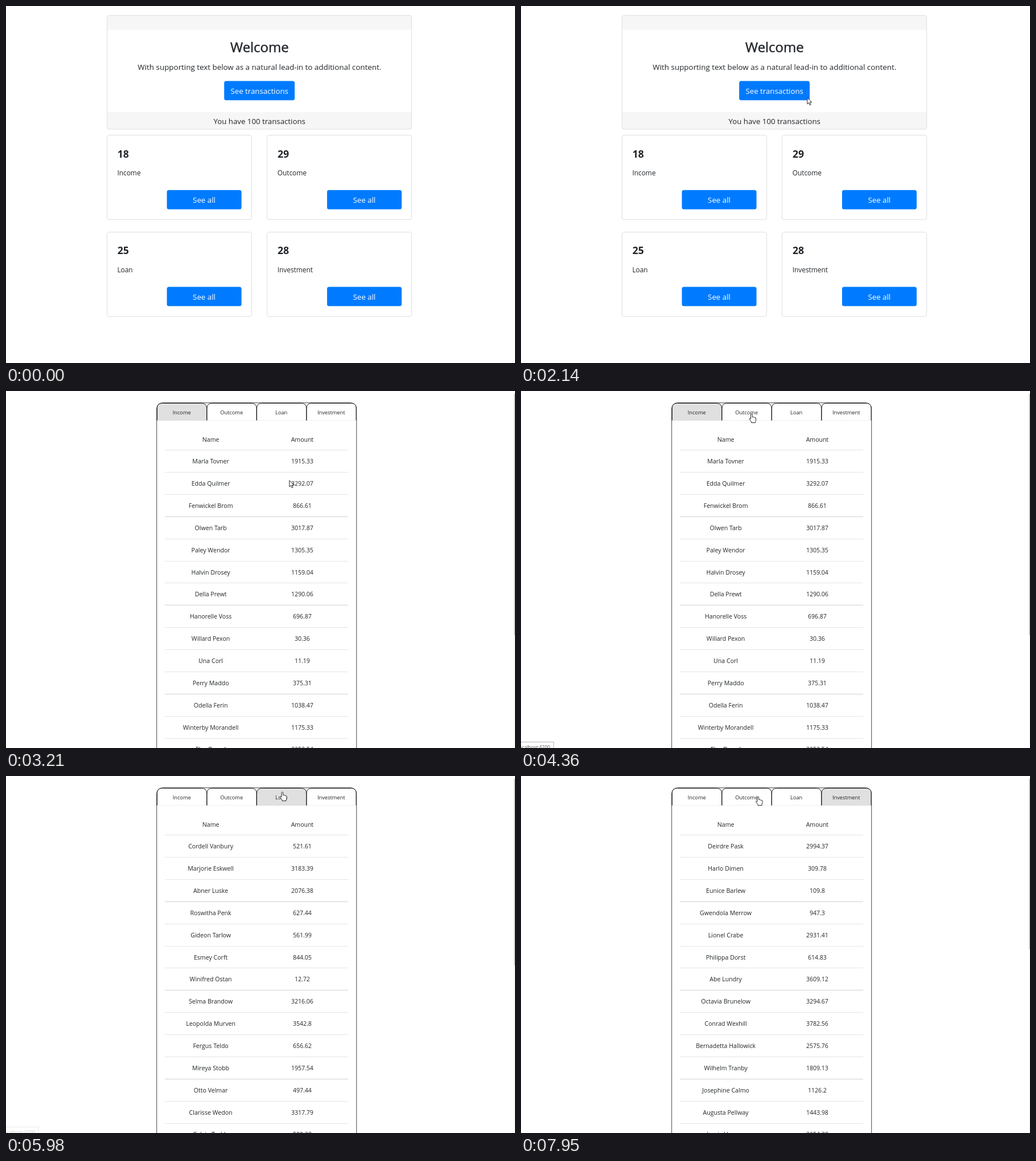
An HTML page that plays this animation: 894 by 626 pixels, repeating every 8 s.

```html
<!DOCTYPE html>
<html lang="en">
<head>
<meta charset="utf-8">
<title>Transactions</title>
<style>
  html, body { margin: 0; width: 100%; height: 100%; overflow: hidden; background: #fff; }
  svg { display: block; width: 894px; height: 626px; }
  text { font-family: "Open Sans", "Noto Sans", sans-serif; fill: #212529; }
  .mid { text-anchor: middle; }
  .title { stroke: #212529; stroke-width: .45; }
  .btn { fill: #007bff; }
  .light { fill: #fff; }
  .card { fill: none; stroke: #dfdfdf; }
  .edge { fill: none; stroke: #222; }
</style>
</head>
<body>
<svg id="stage" viewBox="0 0 894 626"></svg>
<script>
const LOOP = 8000;
const tabs = ["Income", "Outcome", "Loan", "Investment"];
const counts = [18, 29, 25, 28];
const thumbEnds = [428, 295, 332, 304];
const clicks = [2740, 4700, 5790, 6930];   // when each table opens
const tables = [
  `Marla Tovner 1915.33,Edda Quilmer 3292.07,Fenwickel Brom 866.61,Olwen Tarb 3017.87,
   Paley Wendor 1305.35,Halvin Drosey 1159.04,Della Prewt 1290.06,Hanorelle Voss 696.87,
   Willard Pexon 30.36,Una Corl 11.19,Perry Maddo 375.31,Odella Ferin 1038.47,
   Winterby Morandell 1175.33,Elsa Drood 2252.54`,
  `Hester Colvo 637.46,Wendell Marsk 130.79,Tove Haldon 2954.88,Corin Vade 719.06,
   Petra Windell 3467.11,Bartholme Quennor 2787.56,Lorelle Gantby 1679.23,Sibyl Tranec 3795.72,
   Quentin Albro 1174.04,Theobald Cressy 64.52,Rosanne Holderbyn 1457.18,Orville Tamsk 640.7,
   Ned Falderwin 2048.49,Hollie Wend 2464.34`,
  `Cordell Vanbury 521.61,Marjorie Eskwell 3183.39,Abner Luske 2076.38,Roswitha Penk 627.44,
   Gideon Tarlow 561.99,Esmey Corft 844.05,Winifred Ostan 12.72,Selma Brandow 3216.06,
   Leopolda Murven 3542.8,Fergus Teldo 656.62,Mireya Stobb 1957.54,Otto Velmar 497.44,
   Clarisse Wedon 3317.79,Colvin Turkle 508.23`,
  `Deirdre Pask 2994.37,Harlo Dimen 309.78,Eunice Barlew 109.8,Gwendola Merrow 947.3,
   Lionel Crabe 2931.41,Philippa Dorst 614.83,Abe Lundry 3609.12,Octavia Brunelow 3294.67,
   Conrad Wexhill 3782.56,Bernadetta Hallowick 2575.76,Wilhelm Tranby 1809.13,Josephine Calmo 1126.2,
   Augusta Pellway 1443.98,Lewis Hanner 2654.33`
].map(s => s.split(",").map(r => r.trim().match(/(.+) (\S+)/).slice(1)));

// Pointer path: time, x, y
const path = [
  [330, 866, 626], [1100, 760, 297], [1370, 706, 243], [1930, 521, 169], [2330, 486, 153],
  [3100, 486, 153], [3410, 518, 163], [3690, 518, 163], [4360, 405, 40], [4720, 405, 40],
  [5370, 490, 40], [5510, 485.5, 36], [5590, 485.5, 36], [5650, 485.5, 28], [6140, 485.5, 28],
  [6870, 567.5, 36], [7350, 567.5, 36], [7610, 458.5, 33], [7830, 458.5, 33], [7950, 416.5, 36]
];

const text = (s, x, y, size, cls = "mid", weight = 400) =>
  `<text class="${cls}" x="${x}" y="${y}" font-size="${size}" font-weight="${weight}">${s}</text>`;
const rect = (x, y, w, h, attrs) => `<rect x="${x}" y="${y}" width="${w}" height="${h}" ${attrs}/>`;

const card = (n, i) => {
  const x = i % 2 * 281.3, y = (i >> 1) * 169.7;
  return rect(177.5 + Math.round(x), 226.5 + Math.round(y), 254, 148, 'rx="3.5" class="card"') +
    text(n, 195.7 + x, 265.7 + y, 17.6, "", 700) +
    text(tabs[i], 195.4 + x, 297 + y, 11.9, "") +
    rect(282.6 + x, 322.8 + y, 131, 33.8, 'rx="3.5" class="btn"') +
    text("See all", 348 + x, 345.2 + y, 13.3, "mid light");
};

const home = `<g id="home">
  ${rect(178, 17, 534.5, 25, 'fill="#f6f6f6"')}
  ${rect(178, 186, 534.5, 30, 'fill="#f6f6f6"')}
  ${rect(177.5, 16.5, 535, 199.5, 'rx="3.5" class="card"')}
  ${text("Welcome", 445.3, 80.7, 23.9, "mid title")}
  ${text("With supporting text below as a natural lead-in to additional content.", 445.3, 112.4, 13.4)}
  ${rect(382.2, 130.4, 125.8, 36, 'rx="4.5" fill="#80bdff" id="ring"')}
  ${rect(383.2, 131.5, 123.8, 33.8, 'rx="3.5" id="go"')}
  ${text("See transactions", 445.2, 154, 13.25, "mid light")}
  ${text("You have 100 transactions", 445.2, 206.7, 13.25)}
  ${counts.map(card).join("")}</g>`;

const row = ([name, amount], y) => text(name, 359.6, y, 10.6) + text(amount, 520.4, y, 10.5);

const tab = (name, i) => {
  const l = 265.5 + i * 87.5, r = l + 87;
  return `<path class="edge" id="tab${i}" d="M${l} 51.5V30Q${l} 21.5 ${l + 9} 21.5H${r - 9}Q${r} 21.5 ${r} 30V51.5"/>` +
    text(name, l + 43.2, 41.2, 9.25);
};

let lines = "";
for (let i = 0; i < 14; i++) {
  const dark = i % 4 == 3;
  lines += rect(279, Math.round(103.2 + i * 38.88), 322, 1, `fill="${dark ? "#cfd2d5" : "#e2e5e8"}"`);
}

const list = `<g id="list">
  ${rect(264.7, 20.7, 351, 640, 'rx="10" class="edge" style="stroke:#444"')}
  ${rect(265, 51, 350, 1, 'fill="#e0e0e0"')}
  ${tabs.map(tab).join("")}
  ${row(["Name", "Amount"], 89)}${lines}
  ${tables.map((t, k) => `<g id="rows${k}">${t.map((r, i) => row(r, Math.round(127.3 + i * 38.86))).join("")}</g>`).join("")}
  ${rect(892.5, 5, 1.5, 621, 'fill="#f1f1f1"')}
  ${rect(892.5, 5, 1.5, 1, 'fill="#c1c1c1" id="thumb"')}
  <g id="status">${rect(-2, 615.5, 59.3, 20, 'fill="#fff" stroke="#b4b4b4"')}
  <text x="51" y="628.3" font-size="8.4" text-anchor="end" style="fill:#555">localhost:4200</text></g></g>`;

const pointer = `<g id="pointer" fill="#fff" stroke="#111" stroke-width=".9" stroke-linejoin="round">
  <path id="arrow" d="M.3 .3V11.4L2.8 9L4.7 13.2L6.5 12.4L4.7 8.4H8.2Z"/>
  <path id="hand" d="M-1.5 9V1.4Q-1.5 .2 -.2 .2T1.2 1.4V5.6Q3.5 4.9 3.7 6.1Q5.8 5.5 5.9 6.9Q7.6 6.5 7.6 8V11.2L6.5 13.8V15.6H-.4V14L-3.8 9.6Q-4.3 7.9 -2.9 7.9Z"/></g>`;

const $ = id => document.getElementById(id);
$("stage").innerHTML = home + list + pointer;

const show = (id, on) => $(id).style.display = on ? "" : "none";
const ramp = (t, a, b) => Math.min(1, Math.max(0, (t - a) / (b - a)));

function pointerAt(t) {
  const k = path.findIndex(p => p[0] > t);
  if (k < 1) return (k ? path[path.length - 1] : path[0]).slice(1);
  const [t0, x0, y0] = path[k - 1], [t1, x1, y1] = path[k], f = ramp(t, t0, t1);
  return [x0 + (x1 - x0) * f, y0 + (y1 - y0) * f];
}

function draw(t) {
  const open = clicks.filter(c => t >= c).length - 1;
  show("home", open < 0);
  show("list", open >= 0);

  const hover = ramp(t, 2130, 2280), press = ramp(t, 2540, 2670);
  $("go").style.fill = `rgb(0,${123 - 18 * hover - 7 * press},${255 - 38 * hover - 13 * press})`;
  $("ring").style.opacity = press;

  tabs.forEach((_, i) => {
    show("rows" + i, i == open);
    $("tab" + i).style.fill = i == open ? "#e0e0e0" : "#fff";
  });
  if (open >= 0) $("thumb").setAttribute("height", thumbEnds[open] - 5);
  $("status").style.opacity = t < 5300
    ? ramp(t, 4150, 4350) - ramp(t, 4700, 4900)
    : ramp(t, 5350, 5510) - ramp(t, 5790, 6050);

  const [x, y] = pointerAt(t), onTab = open >= 0 && y < 52;
  show("pointer", t >= 330);
  show("arrow", !onTab);
  show("hand", onTab);
  $("pointer").setAttribute("transform", `translate(${x} ${y})`);
}

const start = performance.now();
(function tick() {
  draw((performance.now() - start) % LOOP);
  requestAnimationFrame(tick);
})();
</script>
</body>
</html>
```
